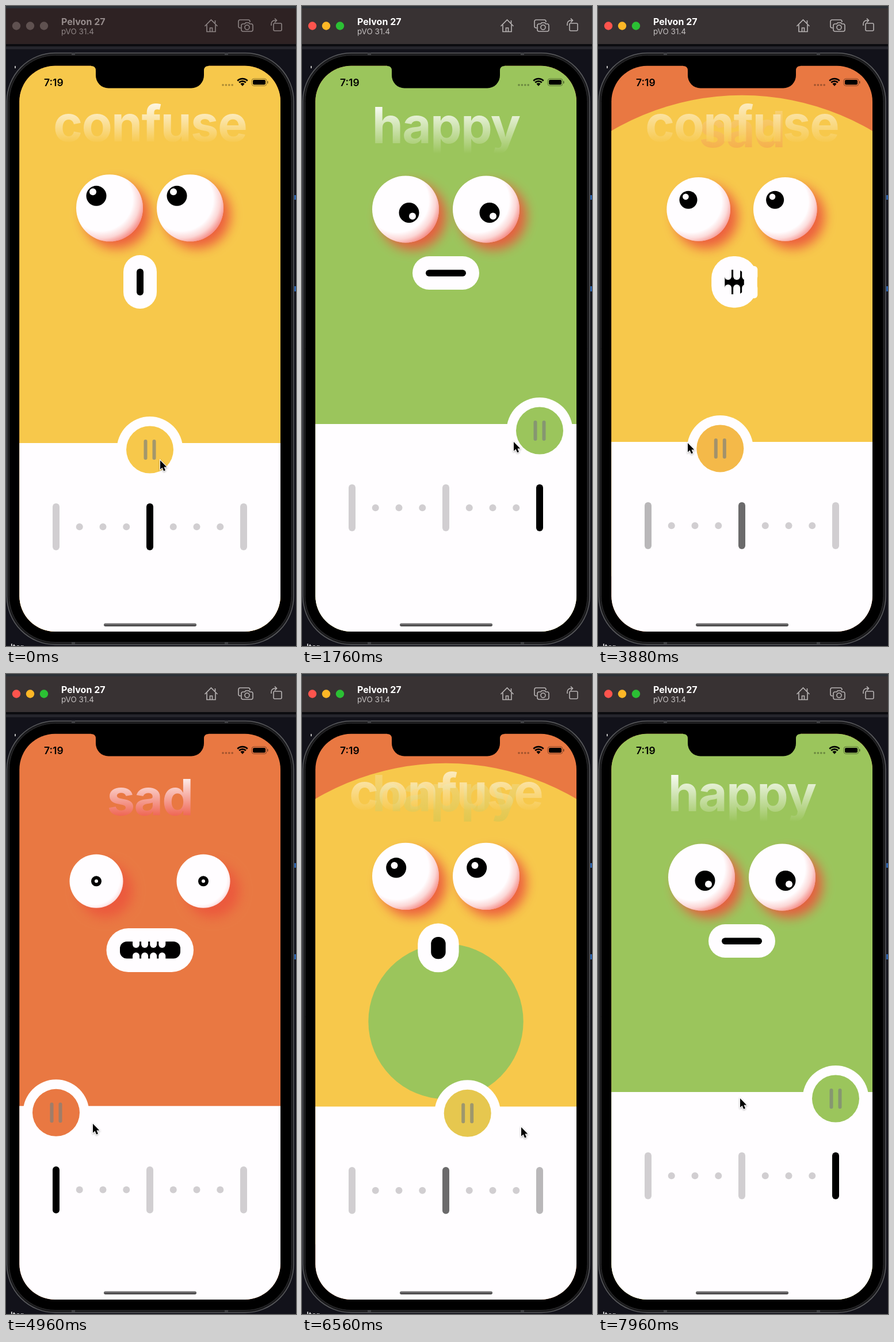
An HTML page with a canvas that plays this animation: 504x1110 px, repeating every 8000 ms.

```html
<!DOCTYPE html>
<html lang="en">
<head>
<meta charset="utf-8">
<title>Mood slider</title>
<style>
html, body { margin: 0; width: 504px; height: 1110px; overflow: hidden; background: #12121a; }
canvas { display: block; }
</style>
</head>
<body>
<canvas id="stage" width="504" height="1110"></canvas>
<script>
const ctx = document.getElementById('stage').getContext('2d');
const LOOP = 8000, SLIDE = 500, MID = 250, REACH = 163, FLOOD = 582.5;
const WHITE = '#fffdff', FONT = 'Inter, "Liberation Sans", sans-serif';

// Moods along the slider: 0 sad, 1 confused, 2 happy
const MOODS = [
  { word: 'sad', base: 245, fade: [172, 246], ink: '#ef6654', color: [233, 120, 66],
    panel: 749.3, eye: [157, 359.3, 46.5], pupil: [0, 0, 9], glint: [0, 0, 3], shade: [16, 5],
    lips: [174.5, 441, 151.5, 76], gap: [198, 464, 105, 29.5] },
  { word: 'confuse', base: 234.5, fade: [156, 239], ink: '#f7c84b', color: [247, 200, 75],
    panel: 758, eye: [180, 350.3, 58], pupil: [-23, -21, 17.5], glint: [-6, -7, 6], shade: [12, 15],
    lips: [204, 432, 58, 93], gap: [227, 455.5, 12, 46.5] },
  { word: 'happy', base: 238, fade: [168, 256], ink: '#9bc55c', color: [155, 197, 92],
    panel: 725, eye: [180, 352.5, 58], pupil: [6, 6, 17.5], glint: [6, 6, 6], shade: [12, 15],
    lips: [192, 434, 116, 58], gap: [215, 457.5, 70, 11.5] }
];

// [start time, mood to slide to]
const TAPS = [[1040, 2], [2414, 1], [3711, 0], [5250, 1], [6391, 2]];

// [time, x, y] of the pointer tip
const POINTER = [
  [0, 267, 787], [640, 267, 787], [1000, 367, 755], [1800, 367, 755], [2380, 267, 727],
  [2900, 267, 727], [3660, 155, 757], [3900, 155, 757], [4300, 150, 779], [4980, 150, 779],
  [5230, 262, 772], [5700, 262, 772], [6340, 380, 785], [6700, 380, 785], [7300, 300, 748], [7900, 246, 735]
];

const clamp = v => Math.max(0, Math.min(1, v));
const lerp = (a, b, t) => a + (b - a) * t;
const easeInOut = t => t < .5 ? 2 * t * t : 1 - 2 * (1 - t) ** 2;

// Colours blend in linear light
const mix = (a, b, t) =>
  `rgb(${a.map((v, i) => lerp(v ** 2.2, b[i] ** 2.2, t) ** (1 / 2.2)).join()})`;

function moodAt(time) {
  let mood = 1;
  for (const [start, goal] of TAPS) mood = lerp(mood, goal, easeInOut(clamp((time - start) / SLIDE)));
  return mood;
}

function pointerAt(time) {
  const next = POINTER.findIndex(k => k[0] > time);
  if (next < 0) return POINTER.at(-1).slice(1);
  const [from, to] = [POINTER[next - 1], POINTER[next]];
  const t = easeInOut((time - from[0]) / (to[0] - from[0]));
  return [lerp(from[1], to[1], t), lerp(from[2], to[2], t)];
}

function disc(x, y, r, fill) {
  ctx.fillStyle = fill;
  ctx.beginPath();
  ctx.arc(x, y, Math.max(0, r), 0, 7);
  ctx.fill();
}

function box(x, y, w, h, r, fill, line, width = 1) {
  ctx.beginPath();
  ctx.roundRect(x, y, w, h, r);
  if (fill) { ctx.fillStyle = fill; ctx.fill(); }
  if (line) { ctx.strokeStyle = line; ctx.lineWidth = width; ctx.stroke(); }
}

function text(str, x, y, font, fill) {
  ctx.font = `${font} ${FONT}`;
  ctx.fillStyle = fill;
  ctx.fillText(str, x, y);
}

function fade(y0, y1, from, to) {
  const g = ctx.createLinearGradient(0, y0, 0, y1);
  g.addColorStop(0, from);
  g.addColorStop(1, to);
  return g;
}

const ICONS = new Path2D(
  'M345.5 35L356.5 24L367.5 35M349 32.5V44.5H364V32.5M363.5 30V25M354.5 44V38H358.5V44' +
  'M408 38H407A3 3 0 0 1 404 35V27A3 3 0 0 1 407 24H421A3 3 0 0 1 424 27V28' +
  'M411.5 31H415L416.5 29H422L423.5 31H426A3 3 0 0 1 429 34V41A3 3 0 0 1 426 44H412A3 3 0 0 1 409 41V34A3 3 0 0 1 411.5 31' +
  'M423 37A4 4 0 1 1 415 37A4 4 0 1 1 423 37' +
  'M467 30H477A2 2 0 0 1 479 32V41A2 2 0 0 1 477 43H467A2 2 0 0 1 465 41V32A2 2 0 0 1 467 30' +
  'M461 34V31A6 6 0 0 1 467 25H470M467 21.5L470.5 25L467 28.5');

function drawWindow(active) {
  box(0, 0, 504, 1110, 0, '#12121a');
  box(0, 0, 504, 4, 0, '#2b3036');
  box(0, 4, 504, 62, 0, active ? '#383233' : '#2e2223');
  box(0, 66, 504, 4, 0, '#0c0c10');
  box(0, 70, 504, 5, 0, '#25252c');
  const lights = active ? ['#fe544d', '#fdb726', '#2bc034'] : Array(3).fill('#5f5150');
  lights.forEach((c, i) => disc(18 + 24 * i, 34.5, 7.2, c));
  text('Pelvon 27', 96, 32.5, '700 16px', active ? '#fff' : '#958b8b');
  text('pVO 31.4', 96, 49, '400 13.5px', active ? '#c4c0c0' : '#8e8585');
  ctx.strokeStyle = active ? '#b7b3b3' : '#8d8484';
  ctx.lineWidth = 1.6;
  ctx.stroke(ICONS);
  box(15, 104, 2, 4, 0, '#bbb');
  box(501, 328, 3, 8, 0, '#2a5fa8');
  box(501, 486, 3, 9, 0, '#2a5fa8');
  text('lter', 8, 1117, '600 14px', '#ddd');
}

function drawPhone() {
  box(1.5, 81.5, 498.5, 1026, 84, '#1a1a1c', '#5b5c5f', 1.5);
  box(5.5, 85.5, 490.5, 1018, 80, '#000', '#2e2e30');
  for (const y of [81, 1103]) for (const x of [114, 380]) box(x, y, 6, 4, 0, '#3e3f42');
}

function drawNotch() {
  ctx.fillStyle = '#000';
  ctx.fill(new Path2D('M148 103V104Q156 104 156 112V120A22 22 0 0 0 178 142.5H322A22 22 0 0 0 344 120V112Q344 104 352 104V103Z'));
}

function drawStatus() {
  text('7:19', 66, 139, '600 17.5px', '#000');
  for (let i = 0; i < 4; i++) disc(377 + 5.4 * i, 137, 1.8, 'rgba(0,0,0,.32)');
  ctx.strokeStyle = '#000';
  ctx.lineWidth = 2.7;
  for (const r of [12.3, 8.2]) {
    ctx.beginPath();
    ctx.arc(411, 138.5, r, -Math.PI * .75, -Math.PI * .25);
    ctx.stroke();
  }
  ctx.fillStyle = '#000';
  ctx.beginPath();
  ctx.moveTo(411, 139);
  ctx.arc(411, 138.5, 5, -Math.PI * .75, -Math.PI * .25);
  ctx.fill();
  box(427, 126, 26, 12.5, 4, null, 'rgba(0,0,0,.42)');
  box(429, 128, 22, 8.5, 2.3, '#000');
  box(454, 130, 1.6, 4.5, 1, 'rgba(0,0,0,.45)');
}

function drawWord(mood, alpha) {
  if (alpha <= 0) return;
  ctx.globalAlpha = alpha;
  ctx.textAlign = 'center';
  ctx.letterSpacing = '-1.7px';
  text(mood.word, MID, mood.base, '700 87px', fade(...mood.fade, '#fff', mood.ink));
  ctx.letterSpacing = '0px';
  ctx.textAlign = 'left';
  ctx.globalAlpha = 1;
}

function drawEye(x, y, r, pupil, glint, [drop, inner]) {
  ctx.save();
  ctx.shadowColor = 'rgba(235,86,60,.92)';
  ctx.shadowOffsetX = ctx.shadowOffsetY = drop;
  ctx.shadowBlur = 20;
  disc(x, y, r, WHITE);
  ctx.restore();
  const g = ctx.createRadialGradient(x - inner, y - inner, r - inner * .2, x - inner, y - inner, r + inner * 1.45);
  g.addColorStop(0, 'rgba(240,80,70,0)');
  g.addColorStop(.5, `rgba(240,80,70,${inner * .015})`);
  g.addColorStop(1, `rgba(240,80,70,${inner * .045})`);
  disc(x, y, r, g);
  const px = x + pupil[0], py = y + pupil[1];
  disc(px, py, pupil[2], '#000');
  disc(px + glint[0], py + glint[1], glint[2], WHITE);
}

// Corner radii shrink by themselves when a side is too short for them
function drawMouth(lips, gap, teeth) {
  box(...lips, 38, WHITE);
  box(...gap, 12, '#000');
  ctx.globalAlpha = teeth;
  for (let i = 0; i < 4; i++)
    for (const y of [451, 483]) box(220 + 15.1 * i, y, 12, 24, 6, WHITE);
  ctx.globalAlpha = 1;
}

function drawPanel(top, mood, weights, color) {
  const x = MID + (mood - 1) * REACH, y = top + 11.5;
  box(23, top, 455, 1090 - top, 0, WHITE);
  disc(x, y, 57.5, WHITE);
  disc(x, y, 41, color);
  for (const dx of [-10.5, 4.5]) box(x + dx, y - 17.5, 6, 35, 3, 'rgba(125,128,124,.68)');
  for (let i = 0; i < 9; i++) {
    const tx = MID - REACH + i * REACH / 4;
    if (i % 4) disc(tx, top + 145.3, 6, '#d1ced1');
    else box(tx - 6, top + 104.6, 12, 81.5, 6, mix([209, 206, 209], [0, 0, 0], weights[i / 4]));
  }
  box(170, 1070.5, 161, 5.5, 2.75, fade(1070, 1076, '#8a888a', '#3c3b3c'));
}

const ARROW = new Path2D('M0 0V17.5L4 13.8L6.8 20.5L10 19.2L7.2 12.7H12.5Z');

function drawPointer(x, y) {
  ctx.save();
  ctx.translate(x + 1, y + 1);
  ctx.scale(.9, .9);
  ctx.save();
  ctx.lineWidth = 2.2;
  ctx.strokeStyle = '#fff';
  ctx.shadowColor = 'rgba(0,0,0,.35)';
  ctx.shadowBlur = 3;
  ctx.shadowOffsetY = 1;
  ctx.stroke(ARROW);
  ctx.restore();
  ctx.fillStyle = '#000';
  ctx.fill(ARROW);
  ctx.restore();
}

function draw(time) {
  const mood = moodAt(time);
  const from = MOODS[mood < 1 ? 0 : 1], to = MOODS[mood < 1 ? 1 : 2];
  const t = mood < 1 ? mood : mood - 1;
  const blend = key => from[key].map((v, i) => lerp(v, to[key][i], t));
  const weights = MOODS.map((_, i) => clamp(1 - Math.abs(mood - i)));

  drawWindow(time >= 620);
  drawPhone();

  ctx.save();
  ctx.beginPath();
  ctx.roundRect(23.3, 103.7, 453.7, 981.3, 62);
  ctx.clip();
  box(23, 103, 455, 983, 0, `rgb(${MOODS[0].color})`);
  for (const i of [1, 2]) disc(MID, 602.7, FLOOD * weights[i], `rgb(${MOODS[i].color})`);
  MOODS.forEach((m, i) => drawWord(m, weights[i]));
  const [x, y, r] = blend('eye');
  for (const ex of [x, 2 * MID - x]) drawEye(ex, y, r, blend('pupil'), blend('glint'), blend('shade'));
  drawMouth(blend('lips'), blend('gap'), clamp((1 - mood) * 10));
  drawPanel(lerp(from.panel, to.panel, t), mood, weights, mix(from.color, to.color, t));
  drawStatus();
  ctx.restore();

  drawNotch();
  drawPointer(...pointerAt(time));
}

const began = performance.now();
function tick() {
  draw((performance.now() - began) % LOOP);
  requestAnimationFrame(tick);
}
tick();
</script>
</body>
</html>
```
